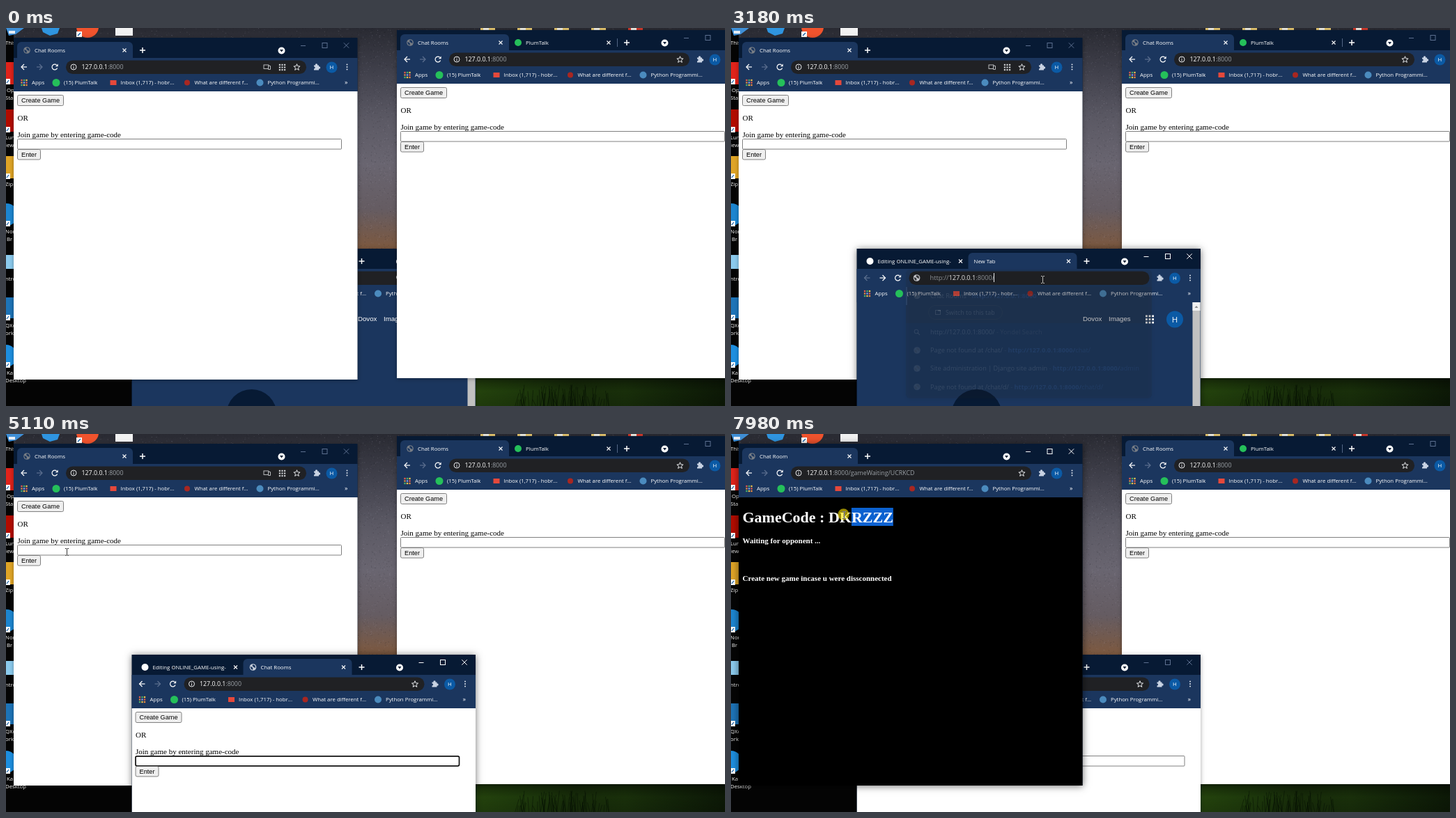
Animation of 1032 by 543 pixels, one loop 8000 ms. Source, as an HTML page with a canvas:

```html
<!DOCTYPE html>
<html lang="en">
<head>
<meta charset="utf-8">
<title>Chat Rooms</title>
<style>
html, body { margin: 0; width: 100%; height: 100%; overflow: hidden; background: #000; }
canvas { display: block; }
</style>
</head>
<body>
<canvas id="stage" width="1032" height="543"></canvas>
<script>
const W = 1032, H = 543, LOOP = 8000;
const ctx = document.getElementById('stage').getContext('2d');
const UI = '"Open Sans", "Noto Sans", sans-serif';
const ARIAL = '"Liberation Sans", Arial, sans-serif';
const SERIF = '"Liberation Serif", "Times New Roman", serif';
const STRIP = '#071a34', BAR = '#1b365e', DARK = '#202124', DIM = '#5d7090', GREY = '#9aa0a6', LINK = '#5b93f7';
const GREEN = '#25c05a', BLUE = '#0b5aa5', EDGE = '#808080';
const URL_SIZE = 8.85, LIST_SIZE = 9.2;

// Primitives
function box(x, y, w, h, color) { ctx.fillStyle = color; ctx.fillRect(x, y, w, h); }
function round(x, y, w, h, r, fill, stroke, lw = 1) {
  ctx.beginPath();
  ctx.roundRect(x, y, w, h, r);
  if (fill) { ctx.fillStyle = fill; ctx.fill(); }
  if (stroke) { ctx.strokeStyle = stroke; ctx.lineWidth = lw; ctx.stroke(); }
}
function disc(x, y, r, color) {
  ctx.beginPath(); ctx.arc(x, y, r, 0, 7); ctx.fillStyle = color; ctx.fill();
}
function ring(x, y, r, color, lw = 1, from = 0, to = 7) {
  ctx.beginPath(); ctx.arc(x, y, r, from, to);
  ctx.strokeStyle = color; ctx.lineWidth = lw; ctx.stroke();
}
function line(color, lw, ...pts) {
  ctx.beginPath();
  for (let i = 0; i < pts.length; i += 2) ctx.lineTo(pts[i], pts[i + 1]);
  ctx.strokeStyle = color; ctx.lineWidth = lw; ctx.stroke();
}
function poly(color, ...pts) {
  ctx.beginPath();
  for (let i = 0; i < pts.length; i += 2) ctx.lineTo(pts[i], pts[i + 1]);
  ctx.closePath(); ctx.fillStyle = color; ctx.fill();
}
// y is the middle of the capitals; returns the x where the text ends
function text(s, x, y, size = 7.8, color = '#fff', font = UI, weight = font === UI ? 500 : 400) {
  ctx.font = `${weight} ${size}px ${font}`;
  ctx.fillStyle = color;
  ctx.fillText(s, x, y + size * 0.36);
  return x + ctx.measureText(s).width;
}
function centered(...args) {
  ctx.textAlign = 'center'; text(...args); ctx.textAlign = 'left';
}

// Icons
function cross(x, y, r, color, lw = 1.1) {
  line(color, lw, x - r, y - r, x + r, y + r);
  line(color, lw, x - r, y + r, x + r, y - r);
}
function plus(x, y) {
  line('#fff', 1.5, x - 4, y, x + 4, y);
  line('#fff', 1.5, x, y - 4, x, y + 4);
}
function globe(x, y, color, land = DARK) {
  disc(x, y, 4.8, color);
  poly(land, x - 4, y - 1, x - 1, y, x, y + 2, x - 1, y + 4, x - 3, y + 2);
  poly(land, x, y - 4, x + 3, y - 2.5, x + 3.6, y + 1, x + 1, y, x - 1, y - 2);
}
function info(x, y) {
  ring(x, y, 4, '#e8eaed', 1);
  box(x - 0.5, y - 0.5, 1, 3, '#e8eaed');
  box(x - 0.5, y - 2.5, 1, 1, '#e8eaed');
}
function arrow(x, y, dir, color) {
  line(color, 1.2, x - 4 * dir, y, x + 4 * dir, y);
  line(color, 1.2, x, y - 4, x + 4 * dir, y, x, y + 4);
}
function reload(x, y) {
  ring(x, y, 3.9, '#fff', 1.2, 0.4, 5.4);
  poly('#fff', x + 4.6, y - 4.6, x + 4.6, y - 0.8, x + 0.8, y - 0.8);
}
function star(x, y) {
  const pts = [];
  for (let i = 0; i <= 10; i++) {
    const r = i % 2 ? 2.1 : 4.8, a = i * Math.PI / 5 - Math.PI / 2;
    pts.push(x + r * Math.cos(a), y + r * Math.sin(a));
  }
  line('#e8eaed', 1, ...pts);
}
function magnifier(x, y, color) {
  ring(x - 1, y - 1, 2.8, color, 1.1);
  line(color, 1.2, x + 1, y + 1, x + 4, y + 4);
}
function puzzle(x, y) {
  box(x - 4, y - 2.5, 7, 7, '#c9d3e3');
  disc(x - 0.5, y - 3, 1.7, '#c9d3e3');
  disc(x + 3.5, y + 1, 1.7, '#c9d3e3');
  disc(x - 3.8, y + 1, 1.4, BAR);
}
function dots(x, y, gap, size, colorAt) {
  for (let i = 0; i < 9; i++)
    box(x + (i % 3 - 1) * gap - size / 2, y + (Math.floor(i / 3) - 1) * gap - size / 2, size, size, colorAt(i));
}
function menu(x, y, color = '#dfe5ee') {
  for (const d of [-3.5, 0, 3.5]) disc(x, y + d, 1, color);
}
function spinner(x, y, t) {
  const a = t / 110;
  ring(x, y, 4.5, '#a8c7fa', 1.2, a, a + 1.2 + 0.6 * Math.sin(t / 200));
}

// Browser window; coordinates are those of the left window, moved by dx, dy
function browser(o) {
  const { dx, dy, bottom, tabs, t } = o;
  const height = bottom - dy - 14;
  ctx.save();
  ctx.translate(dx, dy);
  ctx.shadowColor = `rgba(0,0,0,${o.active ? 0.55 : 0.35})`;
  ctx.shadowBlur = o.active ? 10 : 6;
  ctx.shadowOffsetY = 1;
  box(11, 14, 493.5, height, STRIP);
  ctx.shadowColor = 'transparent';

  const tabW = tabs.length > 1 ? 156 : 166;
  tabs.forEach((tab, i) => {
    const x = 16 + i * 155;
    if (tab.on) round(x, 20, tabW, 24, [6, 6, 0, 0], BAR);
    if (tab.loading) spinner(x + 14, 32, t);
    else if (tab.logo) disc(x + 14, 32, 5, tab.logo);
    else if (!tab.bare) globe(x + 14, 32, tab.bright ? '#c6ceda' : '#777d85', BAR);
    text(tab.title, x + (tab.bare ? 8 : 25), 32);
    cross(x + tabW - 12, 32, 2.5, '#fff');
  });
  if (tabs.length > 1 && tabs[0].on) box(327, 26, 1, 12, '#536684');
  plus(tabs.length > 1 ? 341 : 196, 32);
  disc(395.5, 32.5, 5, '#fff');
  poly(STRIP, 393, 31, 398, 31, 395.5, 34.5);

  const ctl = o.active ? '#fff' : DIM;
  line(ctl, 1, 423, 25.5, 430, 25.5);
  ctx.strokeRect(454, 21.5, 7, 7);
  cross(488.5, 25, 3.7, ctl, 1);

  box(11, 43, 493.5, 48, BAR);
  arrow(26, 56, -1, o.forward ? DIM : '#fff');
  arrow(48, 56, 1, o.forward ? '#fff' : DIM);
  if (o.loading) cross(70, 56, 3.5, '#fff', 1.3); else reload(70, 56);
  round(86, 46.5, 345, 19.5, 9.7, DARK);
  if (o.query) {
    disc(97, 56, 5, '#4285f4');
    text('Search Yondel or type a URL', 108, 56, URL_SIZE, GREY);
    magnifier(395, 56, '#e8eaed');
  } else if (o.typed) {
    typedUrl();
  } else {
    info(97, 56);
    text(':8000' + (o.path || ''), text('127.0.0.1', 108.5, 56, URL_SIZE), 56, URL_SIZE, GREY);
  }
  if (o.share) {
    ctx.strokeStyle = '#c8cacd'; ctx.lineWidth = 0.9;
    ctx.strokeRect(370, 53, 7, 5.5);
    round(376.5, 54.5, 3, 5, 0, DARK, '#c8cacd', 0.9);
    dots(396.5, 56.5, 3.6, 2.2, () => '#c8cacd');
  }
  if (!o.noStar) star(417.5, 56.5);
  puzzle(446, 56);
  disc(467.5, 56.5, 8, BLUE);
  centered('H', 467.5, 56.5, 7.8);
  menu(489.5, 56);

  dots(26, 78.5, 3.5, 2.3, i => ['#ea5a4c', '#e98a3c', '#4caf6a', '#7d9df0', '#f0c34a'][i * 2 % 5]);
  text('Apps', 37, 78.5);
  disc(72, 78.5, 5.5, GREEN);
  text('(15) PlumTalk', 83, 78.5);
  box(149.5, 75, 9, 7, '#e5483b');
  text('Inbox (1,717) - hobr...', 164.5, 78.5);
  disc(260, 78.5, 4, '#a82721');
  text('What are different f...', 270.5, 78.5);
  disc(364.5, 78.5, 5, '#4b8bbe');
  text('Python Programmi...', 375.5, 78.5);
  text('»', 486, 77.5, 9);

  ctx.beginPath(); ctx.rect(11, 91, 493.5, height - 77); ctx.clip();
  o.page(o);
  ctx.restore();
}

function typedUrl() {
  globe(97, 56, '#dfe1e5');
  let x = text('http://', 116, 56, LIST_SIZE, GREY);
  x = text('127.0.0.1', x, 56, LIST_SIZE);
  text(':8000/', x, 56, LIST_SIZE, GREY);
}

// Pages
function button(label, y, w, h, fill = '#efefef') {
  round(16.5, y, w, h, 2, fill, EDGE);
  centered(label, 16.5 + w / 2, y + h / 2, 9.17, '#000', ARIAL);
}
function homePage(o) {
  box(11, 91, 494, 460, '#fff');
  button('Create Game', 96.5, 66, 15, o.hover ? '#dedede' : '#efefef');
  text('OR', 16.5, 129.5, 11, '#000', SERIF);
  text('Join game by entering game-code', 16.5, 153, 11, '#000', SERIF);
  if (o.focus) round(16.5, 159.8, 464.5, 14, 2, '#fff', '#101010', 1.7);
  else round(16.5, 159.5, 465, 14.5, 1, '#fff', EDGE);
  if (o.caret) box(20, 161.5, 1, 11, '#000');
  button('Enter', 174.5, 33, 14.5);
}
function newTabPage() {
  box(11, 91, 494, 460, BAR);
  text('Dovox', 335.5, 115, 9.66, '#fff', ARIAL);
  text('Images', 372.5, 115, 9.66, '#fff', ARIAL);
  dots(431.5, 115.5, 4.6, 2.8, () => '#fff');
  disc(467.5, 115.5, 12, BLUE);
  centered('H', 467.5, 115.8, 11.5);
  disc(183, 252, 36, STRIP);
  box(493, 91, 11, 160, '#c1c1c1');
  box(493, 91, 11, 12, '#f1f1f1');
  poly('#8a8a8a', 496, 99, 501, 99, 498.5, 96);
}
function waitingPage(o) {
  box(11, 91, 494, 460, '#000');
  const title = 'GameCode : DKRZZZ', x0 = 16.5;
  ctx.font = `700 22px ${SERIF}`;
  const edge = n => x0 + ctx.measureText(title.slice(0, n)).width;
  if (o.t >= 7790) {
    let n = 11;
    while (n < title.length && edge(n) < o.mouseX) n++;
    box(edge(n), 106, edge(title.length) - edge(n), 26, '#0b61d0');
  }
  text(title, x0, 119, 22, '#fff', SERIF, 700);
  text('Waiting for opponent ...', x0, 153.2, 11, '#fff', SERIF, 700);
  text('Create new game incase u were dissconnected', x0, 207.5, 11, '#fff', SERIF, 700);
}

function suggestions(alpha) {
  ctx.save();
  ctx.globalAlpha = alpha;
  ctx.shadowColor = 'rgba(0,0,0,.5)'; ctx.shadowBlur = 7; ctx.shadowOffsetY = 2;
  round(251, 347, 353, 185, 6, DARK);
  ctx.shadowColor = 'transparent';
  box(251, 372, 353, 52, '#292a2d');
  box(251, 372, 2, 26, '#8ab4f8');
  ctx.save(); ctx.translate(170, 303); typedUrl(); ctx.restore();

  const row = (y, label, host, rest) => {
    globe(267, y, '#c4c7cb');
    let x = text(label, 286, y, LIST_SIZE);
    x = text(' - ', x, y, LIST_SIZE, GREY);
    x = text(host, x, y, LIST_SIZE, LINK, UI, 700);
    text(rest, x, y, LIST_SIZE, LINK);
  };
  const host = 'http://127.0.0.1:8000';
  row(384.5, 'Chat Rooms', host, '');
  cross(590, 384.5, 2.7, '#e8eaed');
  round(283.5, 398.5, 106, 20, 10, null, '#55585c');
  ctx.strokeStyle = '#dfe1e5';
  ctx.strokeRect(293.5, 405.5, 7, 6);
  box(297, 405, 4, 2, '#dfe1e5');
  text('Switch to this tab', 308, 408.5, URL_SIZE);
  magnifier(267, 437, '#c4c7cb');
  text(' - Yondel Search', text('http://127.0.0.1:8000/', 286, 437, LIST_SIZE), 437, LIST_SIZE, GREY);
  row(463, 'Page not found at /chat/', host + '/', 'chat/');
  row(489, 'Site administration | Django site admin', host + '/', 'admin');
  row(515.5, 'Page not found at /chat/d/', host + '/', 'chat/d/');
  ctx.restore();
}

// Desktop, painted once
let seed = 7;
const rnd = () => (seed = seed * 16807 % 2147483647) / 2147483647;
function gradient(x0, y0, x1, y1, colors) {
  const g = ctx.createLinearGradient(x0, y0, x1, y1);
  colors.forEach((c, i) => g.addColorStop(i / (colors.length - 1), c));
  return g;
}
function paintDesktop() {
  box(0, 0, W, H, '#040404');
  box(11, 0, 1021, 330, gradient(0, 0, 0, 325, ['#292a32', '#41414c', '#5b5964', '#696570', '#655c62', '#80583a']));
  for (let i = 0; i < 1500; i++) {
    ctx.globalAlpha = 0.06 + 0.2 * rnd();
    const top = i % 3 === 0;
    box(top ? rnd() * W : 504 + rnd() * 58, rnd() * (top ? 15 : 318), 1, 1, rnd() < 0.5 ? '#15161d' : '#b5b1c0');
  }
  ctx.globalAlpha = 1;
  box(0, 0, 11, 330, '#040404');
  box(674, 500, 358, 43, gradient(674, 0, 1032, 0, ['#2a4e0f', '#22420d', '#1b330b', '#1d370c', '#15290a', '#0e1c07']));
  box(674, 500, 358, 43, gradient(0, 500, 0, 543, ['rgba(0,0,0,.5)', 'rgba(0,0,0,.15)', 'rgba(0,0,0,.25)']));
  for (let i = 0; i < 70; i++) {
    const x = 730 + rnd() * 140;
    line('rgba(4,12,2,.45)', 1, x, 545, x + rnd() * 12 - 6, 512 + rnd() * 22);
  }

  const shortcut = y => { box(0, y, 6, 8, '#fff'); line(BLUE, 1.2, 1, y + 6, 4, y + 2); };
  poly('#3f8fd6', 0, 0, 26, 0, 14, 9, 4, 11);
  box(4, 4, 9, 4, '#e6edf5');
  poly('#2f95e0', 51, 0, 77, 0, 74, 8, 63, 11, 53, 6);
  disc(117, -2, 16, '#f0532d');
  box(101, 5, 8, 8, '#fff');
  line(BLUE, 1.2, 103, 11, 107, 7);
  box(157, 0, 25, 11, '#f2f2f2');
  for (let i = 0; i < 5; i++) {
    const x = 681 + i * 53;
    box(x, 0, 21, 3, i === 4 ? '#d33a2c' : '#e6c76f');
    box(x + 4, 0, 8, 3, '#f1efe6');
  }
  box(0, 49, 11, 32, '#e2231a'); shortcut(73);
  box(0, 117, 11, 32, '#b30b00'); shortcut(142);
  box(0, 184, 11, 32, '#e0a526'); shortcut(209);
  disc(1, 268, 16, '#1c86d1'); shortcut(277);
  box(0, 326, 11, 20, '#8ccbee');
  box(0, 387, 11, 30, '#1d74b8'); shortcut(412);
  disc(0, 471, 16, '#1d8fe0'); shortcut(480);
  const labels = [['This', 21], ['Op', 89], ['Sta', 100], ['Lume', 157], ['iewe', 168], ['Zip', 224],
    ['Nort', 292], ['Br', 303], ['ntro', 360], ['QXo', 427], ['ork', 438], ['Ka', 495], ['Desktop', 506]];
  for (const [s, y] of labels) text(s, s.length < 3 ? 1 : -1, y, 7.8);
}
paintDesktop();
const desktop = document.createElement('canvas');
desktop.width = W; desktop.height = H;
desktop.getContext('2d').drawImage(ctx.canvas, 0, 0);

// Mouse: time, x, y
const PATH = [
  [490, 1040, 550], [1280, 538, 337], [2310, 538, 337], [2700, 447, 361], [4960, 447, 361],
  [5110, 87, 169], [5400, 32, 110], [5580, 17, 90], [5750, 23, 99], [5790, 23, 99], [5820, 24, 100],
  [6560, 24, 100], [7030, 265, 113], [7180, 265, 113], [7300, 258, 115], [7790, 258, 115], [7975, 161.5, 115.5]
];
const CLICKS = [[1560, 1750], [3640, 3890], [6110, 6300], [7580, 8000]];
function mouseAt(t) {
  const i = PATH.findIndex(p => p[0] > t);
  if (i === 0) return PATH[0].slice(1);
  if (i < 0) return PATH[PATH.length - 1].slice(1);
  const [t0, x0, y0] = PATH[i - 1], [t1, x1, y1] = PATH[i];
  let u = (t - t0) / (t1 - t0);
  u = u * u * (3 - 2 * u);
  return [x0 + (x1 - x0) * u, y0 + (y1 - y0) * u];
}
function drawMouse(t, x, y) {
  if (CLICKS.some(([a, b]) => t >= a && t < b)) disc(x, y, 8.2, 'rgba(255,230,0,.6)');
  ctx.save();
  ctx.translate(Math.round(x), Math.round(y));
  if ((t > 2430 && t < 5150) || t >= 7790) {
    ctx.globalCompositeOperation = 'difference';
    ctx.globalAlpha = 0.8;
    box(0, -4, 1, 9, '#fff');
    box(-2, -5, 2, 1, '#fff'); box(1, -5, 2, 1, '#fff');
    box(-2, 5, 2, 1, '#fff'); box(1, 5, 2, 1, '#fff');
  } else {
    poly('#fff', 0.5, 0, 0.5, 9, 2.5, 7.3, 4, 10.3, 5.2, 9.7, 3.9, 6.8, 6.6, 6.6);
    ctx.strokeStyle = '#222'; ctx.lineWidth = 0.8; ctx.stroke();
  }
  ctx.restore();
}

const between = (t, a, b) => t >= a && t < b;

function draw(t) {
  const [mx, my] = mouseAt(t);
  ctx.drawImage(desktop, 0, 0);

  const right = () => browser({
    dx: 550, dy: -11, bottom: 503, t, page: homePage,
    tabs: [{ title: 'Chat Rooms', on: true }, { title: 'PlumTalk', logo: GREEN }]
  });

  const raised = t >= 6110, waiting = t >= 6700, loadingLeft = between(t, 6300, 6960);
  const left = () => browser({
    dx: 0, dy: 0, bottom: 505, t, mouseX: mx,
    active: raised, share: !raised, loading: loadingLeft,
    path: waiting ? '/gameWaiting/UCRKCD' : '',
    hover: between(t, 5400, 6700) && my > 96,
    page: waiting ? waitingPage : homePage,
    tabs: [{ title: waiting ? 'Chat Room' : 'Chat Rooms', on: true, loading: loadingLeft }]
  });

  const typed = between(t, 3140, 4480), loaded = t >= 4620, loadingLow = between(t, 4480, 4780);
  const low = () => {
    browser({
      dx: 169.5, dy: 303, bottom: 560, t,
      active: between(t, 1600, 6110), forward: !loaded, loading: loadingLow,
      query: t < 3140, typed, noStar: between(t, 3140, 5000),
      focus: loaded && !raised, caret: between(t, 4620, 5110) || between(t, 5610, 6110),
      page: loaded ? homePage : newTabPage,
      tabs: [
        { title: 'Editing ONLINE_GAME-using-', logo: '#fff' },
        { title: loaded ? 'Chat Rooms' : 'New Tab', on: true, bright: true, bare: t < 4480, loading: loadingLow }
      ]
    });
    if (typed) suggestions(Math.max(0, Math.min(1, (t - 3168) / 100)));
    if (between(t, 1600, 2110) || between(t, 2610, 3110)) box(278, 352, 1, 13, '#e8eaed');
    if (between(t, 3140, 4190)) box(377, 352, 1, 13, '#e8eaed');
  };

  const order = t < 1560 ? [low, right, left] : raised ? [right, low, left] : [right, left, low];
  for (const paint of order) paint();
  drawMouse(t, mx, my);
}

let start;
function tick(now) {
  start ??= now;
  draw((now - start) % LOOP);
  requestAnimationFrame(tick);
}
draw(0);
requestAnimationFrame(tick);
</script>
</body>
</html>
```
